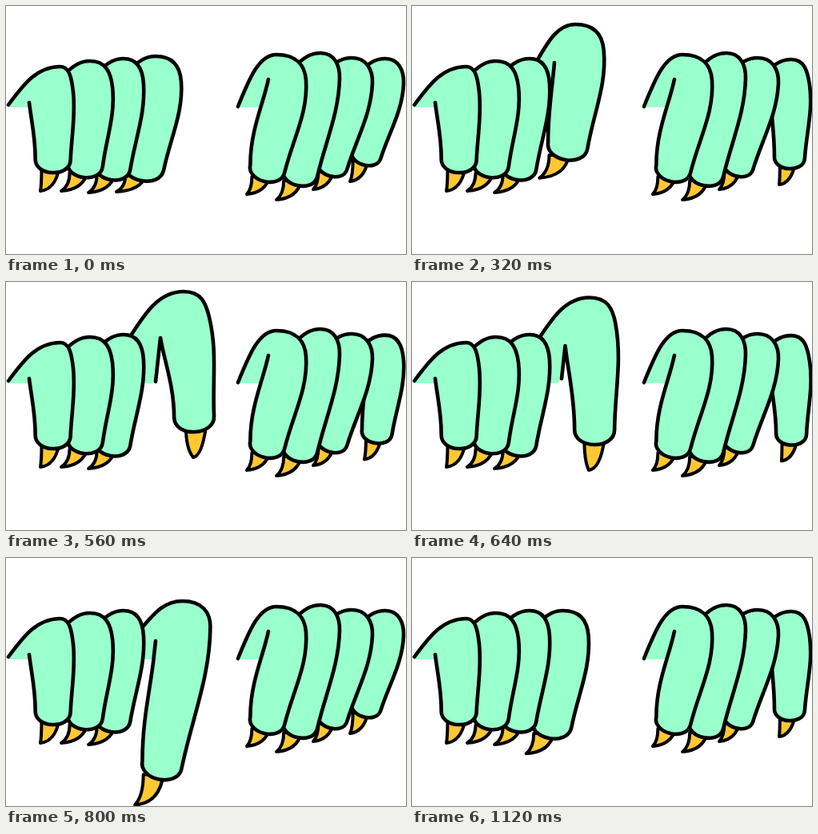
Animation, 500 px wide and 311 px high, one loop 1.2 s. Source, as an HTML page with a canvas:

```html
<!DOCTYPE html>
<html lang="en">
<head>
<meta charset="utf-8">
<title>Tapping fingers</title>
<style>
  html, body { margin: 0; width: 100%; height: 100%; overflow: hidden; background: #fff; }
  canvas { display: block; }
</style>
</head>
<body>
<canvas id="stage" width="500" height="311"></canvas>
<script>
const ctx = document.getElementById('stage').getContext('2d');
const SKIN = '#99ffcc', CLAW = '#ffc832', STEP = 80, LOOP = 1200, CUT = 127;

const lerp = (a, b, k) => a.map((v, i) => v + (b[i] - v) * k);
const mix = (p, q, k) => p.map((point, i) => lerp(point, q[i], k));
const add = (p, v, k = 1) => [p[0] + v[0] * k, p[1] + v[1] * k];
const unit = (a, b) => {
  const len = Math.hypot(b[0] - a[0], b[1] - a[1]);
  return [(b[0] - a[0]) / len, (b[1] - a[1]) / len];
};

// Key points of a finger; root and inner crease follow the knuckle unless given.
function pose(top, right, tip, claw, root = add(top, [-27, 12]), crease = add(top, [-25, 60]), heel = crease) {
  return [top, [right, top[1] + 32], tip, claw, root, crease, heel];
}

function paint(line, area, fill, width) {
  ctx.fillStyle = fill;
  ctx.lineWidth = width;
  ctx.fill(area);
  ctx.stroke(line);
}

function drawClaw([x, y], [tx, ty], w) {
  const left = x + (tx - x) * 0.3 + 2 - w / 2, right = left + w, base = y - 6;
  const p = new Path2D();
  p.moveTo(left, base);
  p.quadraticCurveTo(left, base + (ty - base) * 0.7, tx, ty);
  p.quadraticCurveTo(right - 5, ty - 2, right, base);
  p.closePath();
  paint(p, p, CLAW, 4);
}

// r: half the width at the tip; corners: close the fill without an outline.
function drawFinger([top, side, tip, claw, root, crease, heel], r = 22, corners = []) {
  const up = unit(tip, [side[0] - r, side[1]]);
  const across = [-up[1], up[0]];
  const cap = add(tip, up, r * 0.75);
  const a = add(cap, across, r), b = add(cap, across, -r);
  const down = unit(top, a);
  const reach = 0.35 * Math.hypot(a[0] - side[0], a[1] - side[1]);
  const dx = top[0] - root[0], dy = top[1] - root[1];

  const line = new Path2D();
  const bend = (c1, c2, end) => line.bezierCurveTo(...c1, ...c2, ...end);
  line.moveTo(...root);
  bend(add(root, [dx * 0.3, dy * 0.55]), [root[0] + dx * 0.55, top[1]], top);
  bend([top[0] + (side[0] - top[0]) * 0.7, top[1]], add(side, down, -18), side);
  bend(add(side, down, reach), add(a, up, reach), a);
  bend(add(a, up, -r), add(b, up, -r), b);
  bend([b[0], b[1] + (crease[1] - b[1]) * 0.4], lerp(crease, b, 0.3), crease);
  line.lineTo(...heel);

  const area = new Path2D(line);
  corners.forEach(c => area.lineTo(...c));
  drawClaw(tip, claw, r);
  paint(line, area, SKIN, 4.6);
}

// Left hand: the last finger lifts, swings out, strikes and drags back.
const rest = pose([187, 63], 219, [169, 219], [138, 233]);
const raised = pose([213, 3], 250, [203, 180], [170, 207], [153, 68], [186, 45]);
const swung = pose([222, 12], 254, [236, 188], [234, 220], [153, 72], [193, 70], [187, 125]);
const struck = pose([221, 42], 255, [204, 252], [182, 284], [166, 82], [187, 110]);
const pulled = pose([192, 72], 224, [176, 240], [152, 270], undefined, [174, 122]);
const lowest = mix(swung, struck, 1.4);

// Step, pose, and the power that eases the way to it.
const keys = [
  [0, rest], [2, rest], [5, raised], [7, swung], [9, struck, 2],
  [10, lowest], [12, pulled], [15, rest]
];

function strike(step) {
  const i = keys.findIndex(key => key[0] > step);
  const [from, p] = keys[i - 1], [to, q, power = 1] = keys[i];
  return mix(p, q, ((step - from) / (to - from)) ** power);
}

const leftStill = [
  pose([147, 66], 172, [131, 218], [103, 234]),
  pose([105, 69], 133, [97, 215], [69, 232])
];
const leftFront = pose([68, 76], 84, [58, 209], [43, 232], [3, 124], [29, 121]);

// Right hand: the last finger taps sideways.
const bent = pose([474, 66], 497, [446, 199], [430, 220]);
const open = pose([474, 67], 497, [471, 204], [459, 224]);
const spread = [0, 0, 0.62, 1.1, 1];

const rightStill = pose([393, 59], 417, [364, 225], [338, 243]);
const rightSlim = pose([432, 65], 458, [404, 213], [384, 230]);
const rightFront = pose([338, 61], 375, [323, 220], [301, 236], [290, 126], [328, 92]);

function leftHand(step) {
  drawFinger(strike(step), 25, [[182, CUT], [160, CUT]]);
  leftStill.forEach(p => drawFinger(p));
  drawFinger(leftFront, 22, [[29, CUT], [3, CUT]]);
}

function rightHand(step) {
  drawFinger(mix(bent, open, spread[step % spread.length]), 19);
  drawFinger(rightSlim, 19);
  drawFinger(rightStill);
  drawFinger(rightFront, 22, [[321, CUT], [290, CUT]]);
}

const start = performance.now();
function frame() {
  const step = Math.floor((performance.now() - start) % LOOP / STEP);
  ctx.fillStyle = '#fff';
  ctx.fillRect(0, 0, 500, 311);
  leftHand(step);
  rightHand(step);
  requestAnimationFrame(frame);
}
ctx.lineCap = ctx.lineJoin = 'round';
frame();
</script>
</body>
</html>
```
